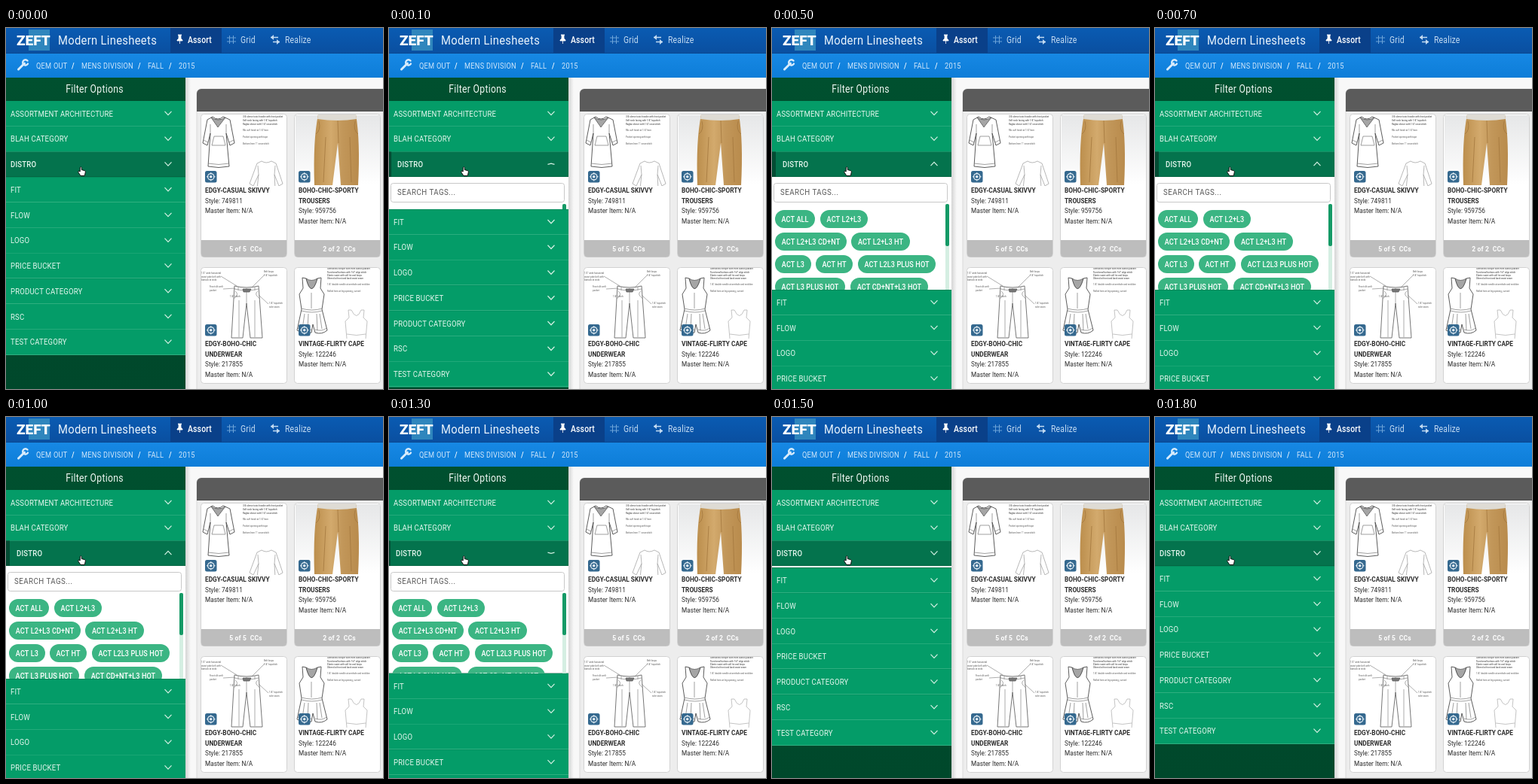
Recreate the animation shown at these times as an HTML page with a canvas. Size 500 by 480 pixels, loop 1.9 s.

```html
<!DOCTYPE html>
<html lang="en">
<head>
<meta charset="utf-8">
<title>Filter options</title>
<style>
html, body { margin: 0; width: 100%; height: 100%; overflow: hidden; }
canvas { display: block; width: 500px; height: 480px; }
</style>
</head>
<body>
<canvas id="stage" width="500" height="480"></canvas>
<script>
const ctx = document.getElementById('stage').getContext('2d');
const LOOP = 1900, STEP = 100;
const CONDENSED = 0.87; // the interface uses a condensed cut of Roboto throughout
const SIDE = 238, ROW_TOP = 97, ROW_H = 33.75, OPEN_ROW = 2, PANEL_TOP = 198, PANEL_H = 150;

const filters = ['ASSORTMENT ARCHITECTURE', 'BLAH CATEGORY', 'DISTRO', 'FIT', 'FLOW', 'LOGO',
  'PRICE BUCKET', 'PRODUCT CATEGORY', 'RSC', 'TEST CATEGORY'];

// each tag: label, left, width
const tagRows = [
  [['ACT ALL', 4, 53], ['ACT L2+L3', 64, 63]],
  [['ACT L2+L3 CD+NT', 4, 95], ['ACT L2+L3 HT', 105, 78]],
  [['ACT L3', 4, 48], ['ACT HT', 58, 49], ['ACT L2L3 PLUS HOT', 114, 103]],
  [['ACT L3 PLUS HOT', 4, 93], ['ACT CD+NT+L3 HOT', 104, 103]]
];

const cards = [
  { x: 259, y: 115, h: 190, title: ['EDGY-CASUAL SKIVVY'], style: 749811, count: '5 of 5  CCs', art: drawTunic },
  { x: 383, y: 115, h: 190, title: ['BOHO-CHIC-SPORTY', 'TROUSERS'], style: 959756, count: '2 of 2  CCs', art: drawChinos },
  { x: 259, y: 319, h: 154, title: ['EDGY-BOHO-CHIC', 'UNDERWEAR'], style: 217855, art: drawPants },
  { x: 383, y: 319, h: 154, title: ['VINTAGE-FLIRTY CAPE'], style: 122246, art: drawRomper }
];

const clamp = v => Math.max(0, Math.min(1, v));
const swing = v => 0.5 - Math.cos(clamp(v) * Math.PI) / 2;

function rect(x, y, w, h, fill) {
  ctx.fillStyle = fill;
  ctx.fillRect(x, y, w, h);
}

function roundRect(x, y, w, h, r, fill, stroke) {
  ctx.beginPath();
  ctx.roundRect(x, y, w, h, r);
  if (fill) { ctx.fillStyle = fill; ctx.fill(); }
  if (stroke) { ctx.strokeStyle = stroke; ctx.lineWidth = 1; ctx.stroke(); }
}

function fade(y0, y1, from, to) {
  const g = ctx.createLinearGradient(0, y0, 0, y1);
  g.addColorStop(0, from);
  g.addColorStop(1, to);
  return g;
}

// y is the middle of the capitals
function text(str, x, y, size, color, { weight = 400, align = 'left', spacing = 0.2, width = CONDENSED } = {}) {
  ctx.save();
  ctx.translate(x, y + size * 0.355);
  ctx.scale(width, 1);
  ctx.font = `${weight} ${size}px Roboto, sans-serif`;
  ctx.letterSpacing = spacing + 'px';
  ctx.textAlign = align;
  ctx.fillStyle = color;
  ctx.fillText(str, 0, 0);
  ctx.restore();
}

function path(d, stroke, lineWidth = 1, fill) {
  const p = new Path2D(d);
  if (fill) { ctx.fillStyle = fill; ctx.fill(p); }
  if (stroke) { ctx.strokeStyle = stroke; ctx.lineWidth = lineWidth; ctx.stroke(p); }
}

function clipped(x, y, w, h, draw) {
  ctx.save();
  ctx.beginPath();
  ctx.rect(x, y, w, h);
  ctx.clip();
  draw();
  ctx.restore();
}

function notes(x, y, lines, leading, color = '#555') {
  lines.forEach((line, i) => text(line, x, y + i * leading, 3.4, color, { spacing: 0 }));
}

function drawHeader() {
  rect(0, 0, 500, 34, fade(0, 34, '#0a5bb2', '#0a4fa0'));
  rect(218, 0, 68, 34, '#0a4089');
  rect(0, 34, 500, 32, fade(34, 66, '#1788e4', '#0d7dd8'));
  rect(0, 33, 500, 1, '#0a4890');

  rect(30, 2, 28, 28, '#2f86bd');
  text('ZEFT', 14, 16, 19, '#fff', { weight: 900, spacing: 0, width: 1 });
  text('Modern Linesheets', 69, 15.5, 17, '#e9f3fc', { spacing: 0.35 });

  path('M228 9h5l-1 1v4l2 2v1h-7v-1l2-2v-4z M230.5 17v4', '#fff', 0.8, '#fff');
  text('Assort', 241, 15.5, 12, '#fff', { weight: 500, spacing: 0.15 });
  path('M296.5 10v11M301.5 10v11M293 13h12M293 18h12', '#6ca3d8', 1);
  text('Grid', 311, 15.5, 12, '#c3dbf2', { spacing: 0.25 });
  path('M351 12.5h10M354 18.5h9', '#c3dbf2', 1.7);
  path('M355 9l-4 3.5l4 3.5z M359 15l4 3.5l-4 3.5z', null, 1, '#c3dbf2');
  text('Realize', 370, 15.5, 12, '#c3dbf2');

  ctx.lineCap = 'round';
  path('M16.5 55L24.5 47', '#d8ecfc', 3);
  path('M28.5 43.5A3.6 3.6 0 1 0 29 47.5', '#d8ecfc', 2.4);
  ctx.lineCap = 'butt';
  const crumb = { spacing: 0.3 };
  [['QEM OUT', 40], ['MENS DIVISION', 100], ['FALL', 188], ['2015', 229]]
    .forEach(([s, x]) => text(s, x, 50.5, 10.6, '#cfe6fa', crumb));
  [87, 175, 216].forEach(x => text('/', x, 50.5, 10.6, '#fff', { weight: 500 }));
}

function drawChevron(y, flip) {
  const dy = 2.4 * flip;
  path(`M210.5 ${y - dy}L215 ${y + dy}L219.5 ${y - dy}`, '#d3f0e3', 1.2);
}

function drawTags(height) {
  clipped(0, PANEL_TOP, SIDE, height, () => {
    rect(0, PANEL_TOP, SIDE, height, '#fff');
    roundRect(2.5, 206.5, 230, 25, 3, '#fff', '#c8c8c8');
    text('SEARCH TAGS...', 11, 218.5, 11.2, '#5a5a5a', { spacing: 0.5 });
    tagRows.forEach((row, i) => row.forEach(([label, x, w]) => {
      const y = 242 + i * 30;
      roundRect(x, y, w, 24, 12, '#3bb583');
      text(label, x + w / 2, y + 12, 10.5, '#fff', { weight: 500, align: 'center', spacing: 0.1 });
    }));
    roundRect(230, 234, 5, 130, 2, '#d5eee2');
    roundRect(230, 234, 5, 56, 2, '#159a66');
  });
}

function drawSidebar(open, indent) {
  const shift = PANEL_H * open;
  clipped(0, 66, SIDE, 414, () => {
    rect(0, 66, SIDE, 414, fade(66, 480, '#00502f', '#00482b'));
    text('Filter Options', 117.5, 81, 14, '#eef7f2', { align: 'center', spacing: 0.35 });
    filters.forEach((name, i) => {
      const active = i === OPEN_ROW;
      const y = ROW_TOP + i * ROW_H + (i > OPEN_ROW ? shift : 0);
      rect(0, y, SIDE, ROW_H + 0.3, active ? '#04734d' : '#049c68');
      rect(0, Math.round(y + ROW_H) - 1, SIDE, 1, active ? '#046643' : '#2eaf80');
      if (active) rect(0, y, 5 * indent, ROW_H, '#044c33');
      text(name, 6 + (active ? 8 * indent : 0), y + 16.6, 11, '#e6f7ef', { weight: active ? 500 : 400 });
      drawChevron(y + 16.2, active ? 1 - 2 * indent : 1);
    });
    if (shift > 0.5) drawTags(shift);
  });
}

function drawTunic() {
  const ink = '#4a4a4a';
  path('M274 118L267 122L261 153L267 156L271 140L268 184Q282 187 296 184L292 140L297 156L303 153L297 122L288 118Q281 124 274 118Z', ink, 0.9, '#fff');
  path('M272 119L281 132L291 119Q281 125 272 119Z', ink, 0.7, '#a5a5a5');
  path('M276 144H288L291 156H273Z M268 180Q282 183 296 180M262 149L268 152M302 149L296 152M271 140V128M292 140V128', '#777', 0.7);
  notes(314, 118, ['3/4 sleeve tunic hoodie with front pocket', 'Self neck facing with 1/4" topstitch',
    'Raglan sleeve with 1/4" coverstitch'], 4.7, '#333');
  notes(314, 136, ['Rib cuff finish at 1/4" hem', 'Pocket opening with tape', 'Bottom hem 1" coverstitch'], 9);
  path('M339 177Q345 181 352 177L358 180L367 207L362 210L356 195L357 214M339 177L333 180L323 207L328 210L335 195L333 214M335 195L334 183M356 195L357 183', '#999', 0.7);
}

function drawChinos() {
  const g = ctx.createLinearGradient(410, 0, 470, 0);
  g.addColorStop(0, '#bd904f');
  g.addColorStop(0.35, '#d3aa6d');
  g.addColorStop(0.6, '#c2975a');
  g.addColorStop(1, '#b88a4b');
  rect(384, 116, 112, 92, fade(116, 208, '#e6e7e8', '#ffffff'));
  path('M414 115H464Q470 150 467 209H444L440 153L433 209H409Q407 150 414 115Z', null, 1, g);
  path('M414 115H464L465 121Q440 125 413 121Z', null, 1, '#dedbd4');
  path('M440 123L441 153M415 124Q418 136 411 141M463 124Q460 136 467 141M424 145L421 205M456 145L458 205', '#a4783e', 0.8);
}

function drawPants() {
  const ink = '#555';
  path('M303 343Q319 347 335 343L340 412H324L319 366L314 412H299Z', ink, 0.8, '#fff');
  path('M303 347Q319 351 335 347M319 346V366M304 350Q310 354 302 360M334 350Q328 354 337 360M308 344V349M330 344V349M309 362V411M330 362V411', '#888', 0.7);
  path('M314 347H325L323 351H315Z', ink, 0.7, '#777');
  path('M285 330L306 343M288 347L304 346M343 328L326 345M348 367L335 355', '#777', 0.6);
  notes(259, 326, ['1/2" wide horizontal', 'waist yoke belt with', 'bartack at ends'], 4.4);
  notes(270, 344, ['Front slit welt', 'pocket'], 4.4);
  notes(342, 324, ['Belt loops', '1/4" topstitch'], 4.4);
  notes(349, 366, ['1/4" topstitch', 'side seam'], 4.4);
  notes(297, 357, ['1/4" stitch'], 4.4);
}

function drawRomper() {
  const ink = '#4a4a4a';
  path('M393 332L394 346L389 354L392 374L386 402Q397 408 405 405L407 394L410 405Q419 408 426 402L419 374L422 354L417 346L418 332L413 333Q405 360 398 333Z', ink, 0.9, '#fff');
  path('M398 333Q405 360 413 333Q405 338 398 333Z', ink, 0.7, '#a5a5a5');
  path('M405 352V373M392 373Q406 377 419 373M392 376Q406 380 419 376M396 380L393 400M401 380L400 402M412 380L413 402M416 380L419 400M387 399Q397 404 405 401M410 401Q419 404 425 399', '#777', 0.7);
  notes(426, 320, ['Sleeveless romper with front button placket', 'Functional buttons with 1/4" edge stitch',
    'Elastic waist with self tie and loops', 'Shirred at front and back waist seam'], 4.4, '#333');
  notes(426, 341, ['1/4" double needle at armhole and neckline', 'Rolled hem at leg opening, curved'], 9);
  path('M454 375L455 385L450 390L452 413M475 375L474 385L479 390L477 413M454 375H458Q465 390 471 375H475M452 407Q465 410 477 407', '#aaa', 0.7);
}

function drawBadge(x, y) {
  roundRect(x, y, 15.5, 15.5, 2.5, '#35698f');
  ctx.beginPath();
  ctx.arc(x + 7.75, y + 7.75, 4.2, 0, Math.PI * 2);
  ctx.strokeStyle = '#e4eef5';
  ctx.lineWidth = 1.2;
  ctx.stroke();
  ctx.beginPath();
  ctx.arc(x + 7.75, y + 7.75, 1.8, 0, Math.PI * 2);
  ctx.fillStyle = '#e4eef5';
  ctx.fill();
  path(`M${x + 7.75} ${y + 2}v2.5m0 6.5v2.5M${x + 2} ${y + 7.75}h2.5m6.5 0h2.5`, '#e4eef5', 1);
}

function drawCard({ x, y, h, title, style, count, art }) {
  roundRect(x - 0.5, y - 0.5, 114, h, 4, '#fff', '#d2d2d2');
  clipped(x, y, 113, 95, art);
  drawBadge(x + 5, y + 75);
  const lines = [...title, `Style: ${style}`, 'Master Item: N/A'];
  lines.forEach((line, i) => text(line, x + 5, y + 100.7 + i * 13.5, 9.5, '#2c2c2c',
    { weight: i < title.length ? 700 : 400, spacing: 0 }));
  if (count) {
    roundRect(x, y + 167, 113, 22.5, [0, 0, 4, 4], '#bdbdbd');
    text(count, x + 59, y + 178.5, 9.8, '#fff', { weight: 700, align: 'center', spacing: 0.2 });
  }
}

function drawContent() {
  rect(SIDE, 66, 262, 414, '#f8f8f8');
  const shadow = ctx.createLinearGradient(SIDE, 0, SIDE + 7, 0);
  shadow.addColorStop(0, '#d4d4d4');
  shadow.addColorStop(1, '#f8f8f8');
  rect(SIDE, 66, 7, 414, shadow);
  roundRect(253, 81, 260, 410, 6, '#ededed', '#dadada');
  roundRect(253, 81, 260, 30, [6, 0, 0, 0], '#5b5b5b');
  rect(253, 110, 247, 1, '#4c4c4c');
  cards.forEach(drawCard);
}

function drawCursor() {
  path('M98.2 191V185.5Q99.2 183.8 100.2 185.5V188.5L104.5 189.7Q105.6 190.3 105.3 192L104.2 196.5H99L95.8 191.8Q95.6 190 97 190.2Z', '#111', 1, '#fff');
}

function render(t) {
  const open = swing((t - 8) / 256) - swing((t - 1264) / 256);
  const indent = clamp(t / 160) - clamp((t - 1240) / 96);
  ctx.clearRect(0, 0, 500, 480);
  drawContent();
  drawSidebar(open, indent);
  drawHeader();
  drawCursor();
}

const start = performance.now();
function tick() {
  const t = (performance.now() - start) % LOOP;
  render(Math.floor(t / STEP) * STEP);
  requestAnimationFrame(tick);
}
tick();
</script>
</body>
</html>
```
